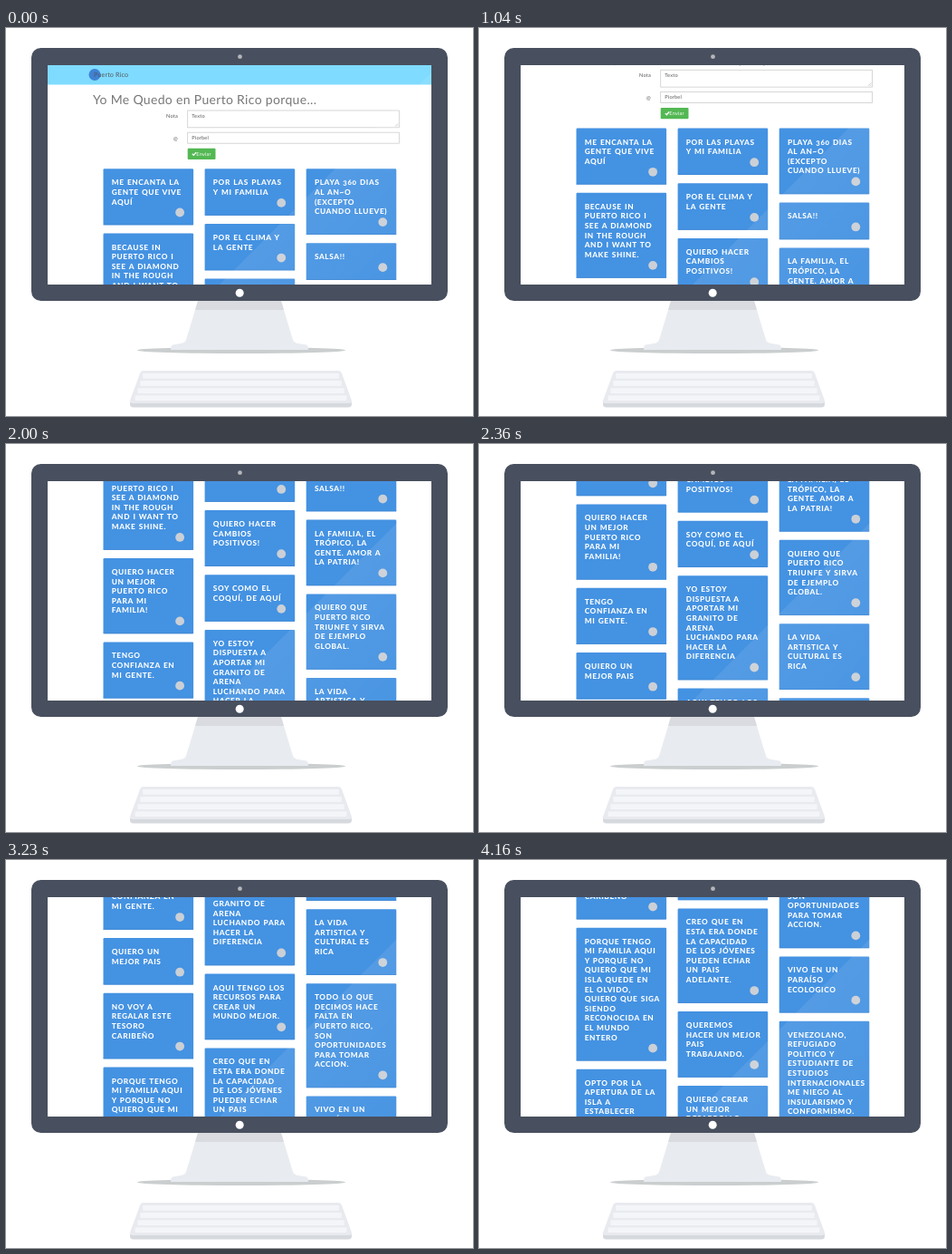
An HTML page for the animation above (4290 ms loop, 516 by 428 pixels).

```html
<!DOCTYPE html>
<html lang="es">
<head>
<meta charset="utf-8">
<title>Muro de notas</title>
<style>
  html, body { margin: 0; width: 100%; height: 100%; overflow: hidden; background: #fff; }
  svg { display: block; width: 516px; height: 428px; }
  text { font-family: Lato, "Open Sans", sans-serif; text-rendering: geometricPrecision; }
  .note { font-size: 8.3px; font-weight: 800; font-variant-numeric: oldstyle-nums; letter-spacing: .6px; word-spacing: .8px; fill: #fff; }
  .small { font-size: 5.6px; letter-spacing: .2px; fill: #555; }
  .field { fill: #fff; stroke: #ccc; stroke-width: .8; }
</style>
</head>
<body>
<svg viewBox="0 0 516 428">
  <defs>
    <clipPath id="screen"><rect x="46" y="41" width="424" height="242"/></clipPath>
    <linearGradient id="gloss" gradientUnits="userSpaceOnUse" x1="353" y1="166" x2="470" y2="283">
      <stop offset="0" stop-color="#fff" stop-opacity=".085"/>
      <stop offset="1" stop-color="#fff" stop-opacity=".02"/>
    </linearGradient>
  </defs>

  <g id="stand">
    <ellipse cx="260" cy="355.5" rx="115" ry="3.6" fill="#cbcecf"/>
    <path d="M212 301H304L317 344Q318 347 323 348L332 349.500Q334 350 334 355H182Q182 350 184 349.500L193 348Q198 347 199 344Z" fill="#e8ebf0"/>
    <path d="M212 301H304L307 311H209Z" fill="#d9dbe0"/>
  </g>

  <g id="keyboard">
    <path d="M137 411H382V415Q382 418.500 378 418.500H141Q137 418.500 137 415Z" fill="#d6d9de"/>
    <path d="M152 378H367Q370 378 371 381L382 411Q383 414 379 414H140Q136 414 137 411L148 381Q149 378 152 378Z" fill="#e8eaef"/>
  </g>

  <rect x="28" y="22" width="460" height="279" rx="10.500" fill="#484f5e"/>
  <circle cx="258.500" cy="31.700" r="2.400" fill="#b4b6ba"/>
  <circle cx="258.200" cy="292.200" r="4.500" fill="#fff"/>

  <g clip-path="url(#screen)">
    <rect x="46" y="41" width="424" height="242" fill="#fff"/>
    <g id="page">
      <rect x="46" y="41" width="424" height="21.500" fill="#7fdbff"/>
      <circle cx="98" cy="51.500" r="6.500" fill="#3f82d4"/>
      <text x="97" y="54" font-size="7.200" letter-spacing=".12" fill="#52585e">Puerto Rico</text>
      <text x="96" y="83.700" font-size="14" letter-spacing=".32" fill="#777">Yo Me Quedo en Puerto Rico porque...</text>
      <text class="small" x="190" y="98.800" text-anchor="end">Nota</text>
      <text class="small" x="190" y="123.500" text-anchor="end">@</text>
      <rect class="field" x="200.700" y="91" width="233.800" height="18.800"/>
      <path d="M430 108.500L433.200 105.300M432 108.500L433.200 107.300" stroke="#999" stroke-width=".5"/>
      <rect class="field" x="200.700" y="115.200" width="233.800" height="12"/>
      <text class="small" x="205.300" y="98.800">Texto</text>
      <text class="small" x="205.300" y="123.200">Piorbel</text>
      <rect x="200.700" y="132.800" width="30.800" height="12.200" rx="1" fill="#53b853"/>
      <path d="M205.800 138.800L207.400 140.400L210 137.200" fill="none" stroke="#fff" stroke-width="1.300"/>
      <text class="small" x="210.300" y="140.800" style="fill:#fff">Enviar</text>
    </g>
    <path d="M470 49V283H236Z" fill="url(#gloss)"/>
  </g>
</svg>
<script>
const NS = "http://www.w3.org/2000/svg";
const page = document.getElementById("page");
const LINE = 10.6, PADDING = 30.2, GAP = 9.25, FIRST_TOP = 155.3, CARD_WIDTH = 99.6;

// One array per column; "|" separates lines.
const columns = [
  [
    "ME ENCANTA LA|GENTE QUE VIVE|AQUÍ",
    "BECAUSE IN|PUERTO RICO I|SEE A DIAMOND|IN THE ROUGH|AND I WANT TO|MAKE SHINE.",
    "QUIERO HACER|UN MEJOR|PUERTO RICO|PARA MI|FAMILIA!",
    "TENGO|CONFIANZA EN|MI GENTE.",
    "QUIERO UN|MEJOR PAIS",
    "NO VOY A|REGALAR ESTE|TESORO|CARIBEÑO",
    "PORQUE TENGO|MI FAMILIA AQUI|Y PORQUE NO|QUIERO QUE MI|ISLA QUEDE EN|EL OLVIDO,|QUIERO QUE SIGA|SIENDO|RECONOCIDA EN|EL MUNDO|ENTERO",
    "OPTO POR LA|APERTURA DE LA|ISLA A|ESTABLECER|"
  ],
  [
    "POR LAS PLAYAS|Y MI FAMILIA",
    "POR EL CLIMA Y|LA GENTE",
    "QUIERO HACER|CAMBIOS|POSITIVOS!",
    "SOY COMO EL|COQUÍ, DE AQUÍ",
    "YO ESTOY|DISPUESTA A|APORTAR MI|GRANITO DE|ARENA|LUCHANDO PARA|HACER LA|DIFERENCIA",
    "AQUI TENGO LOS|RECURSOS PARA|CREAR UN|MUNDO MEJOR.",
    "CREO QUE EN|ESTA ERA DONDE|LA CAPACIDAD|DE LOS JÓVENES|PUEDEN ECHAR|UN PAIS|ADELANTE.",
    "QUEREMOS|HACER UN MEJOR|PAIS|TRABAJANDO.",
    "QUIERO CREAR|UN MEJOR|DESARROLLO|"
  ],
  [
    "PLAYA 360 DIAS|AL AN~O|(EXCEPTO|CUANDO LLUEVE)",
    "SALSA!!",
    "LA FAMILIA, EL|TRÓPICO, LA|GENTE. AMOR A|LA PATRIA!",
    "QUIERO QUE|PUERTO RICO|TRIUNFE Y SIRVA|DE EJEMPLO|GLOBAL.",
    "LA VIDA|ARTISTICA Y|CULTURAL ES|RICA",
    "TODO LO QUE|DECIMOS HACE|FALTA EN|PUERTO RICO,|SON|OPORTUNIDADES|PARA TOMAR|ACCION.",
    "VIVO EN UN|PARAÍSO|ECOLOGICO",
    "VENEZOLANO,|REFUGIADO|POLITICO Y|ESTUDIANTE DE|ESTUDIOS|INTERNACIONALES|ME NIEGO AL|INSULARISMO Y|CONFORMISMO.|"
  ]
];

function add(parent, tag, attributes, content = "") {
  const node = document.createElementNS(NS, tag);
  for (const [key, value] of Object.entries(attributes)) node.setAttribute(key, value);
  node.textContent = content;
  return parent.appendChild(node);
}

function addCard(x, y, lines) {
  const height = PADDING + lines.length * LINE;
  add(page, "rect", { x, y, width: CARD_WIDTH, height, rx: 1.2, fill: "#4492e2" });
  add(page, "rect", { x, y: y + height - 0.8, width: CARD_WIDTH, height: 0.8, fill: "#3d86d2" });
  lines.forEach((line, i) =>
    add(page, "text", { class: "note", x: x + 9.2, y: y + 18 + i * LINE }, line));
  add(page, "circle", { cx: x + 84.6, cy: y + height - 13.8, r: 4.9, fill: "#cbd0d6" });
  return height;
}

columns.forEach((cards, column) => {
  let y = FIRST_TOP;
  for (const card of cards) y += addCard(107.5 + column * 112.1, y, card.split("|")) + GAP;
});

const keyboard = document.getElementById("keyboard");
for (let row = 0; row < 4; row++) {
  const y = 381 + row * 8.1, left = 151 - row * 2.8;
  add(keyboard, "rect", { x: left, y, width: 519 - 2 * left, height: 5.8, rx: 1, fill: "#f4f5f8" });
}

const LOOP = 4290, HOLD = 800, STEP = 30, LAST_STEP = 113, STEP_HEIGHT = 4.966;

function render(time) {
  const t = time % LOOP;
  const step = t < HOLD ? 0 : Math.min(LAST_STEP, Math.floor((t - HOLD) / STEP) + 1);
  page.setAttribute("transform", `translate(0 ${-step * STEP_HEIGHT})`);
}

let start;
function tick(now) {
  start ??= now;
  render(now - start);
  requestAnimationFrame(tick);
}
render(0);
requestAnimationFrame(tick);
</script>
</body>
</html>
```
